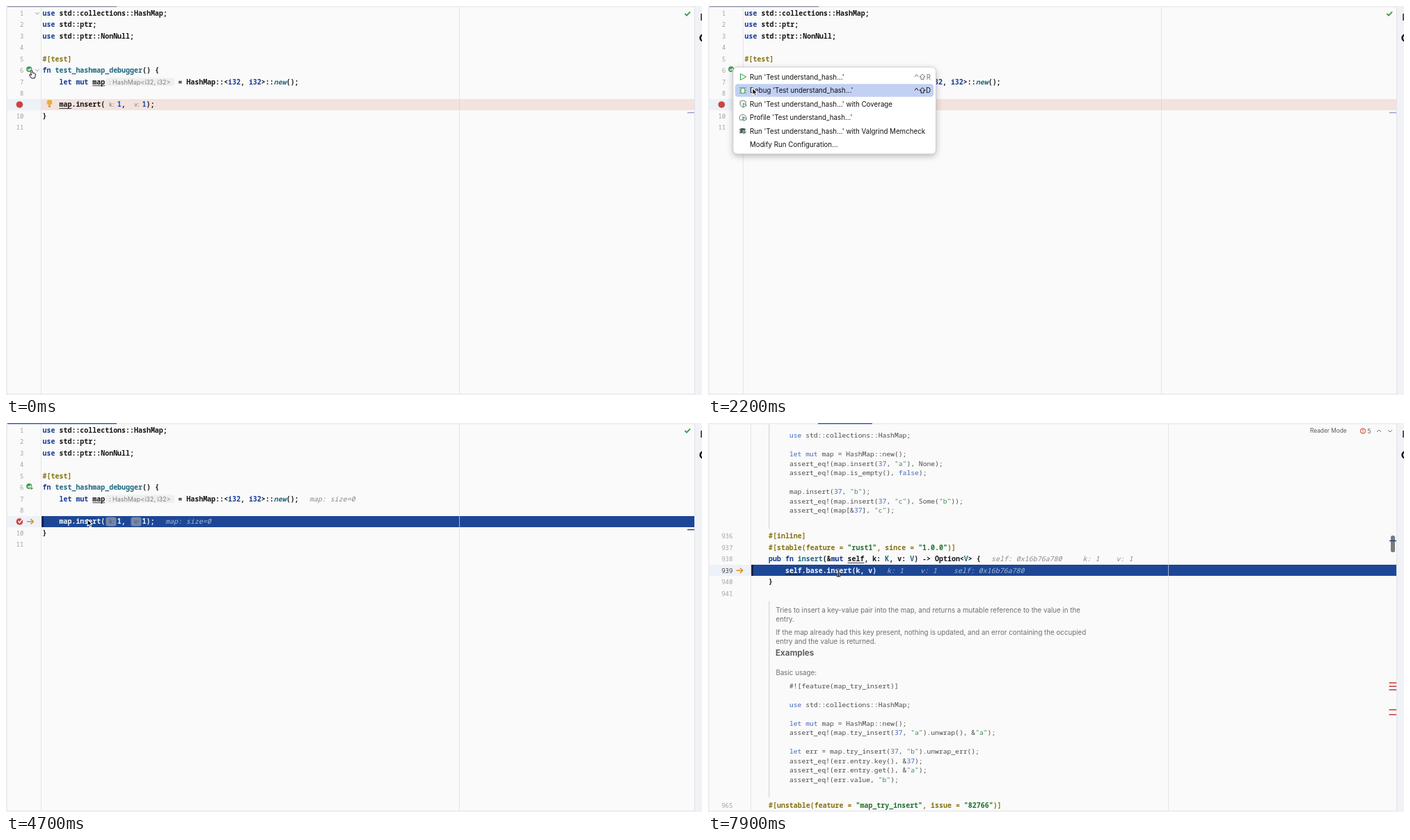
An HTML page with a canvas for the animation above (8000 ms loop, 1000 by 560 pixels).

```html
<!DOCTYPE html>
<html lang="en">
<head>
<meta charset="utf-8">
<title>Debugger step</title>
<style>
html, body { margin: 0; width: 1000px; height: 560px; overflow: hidden; background: #fafafa; }
canvas { display: block; width: 1000px; height: 560px; }
</style>
</head>
<body>
<canvas id="stage"></canvas>
<script>
const canvas = document.getElementById('stage');
const ctx = canvas.getContext('2d');
const dpr = Math.max(1, window.devicePixelRatio || 1);
canvas.width = 1000 * dpr;
canvas.height = 560 * dpr;

const LOOP = 8000;
const MONO = '"Noto Sans Mono", "DejaVu Sans Mono", monospace';
const SANS = 'Inter, "Liberation Sans", sans-serif';
const CODE = 9.96, DOC = 9.68, ADV = CODE * 0.6, ROW = 16.47;
const BLUE = '#1d4796', HINT = '#8a8a8a', GREEN = '#3f9a4e', RED = '#c9443f';

// Moments of the story, in ms
const MENU_OPEN = 1200, MENU_CLOSE = 2800, PAUSED = 4100, STEP_IN = 5100;

const TOKEN = /("[^"]*")|\b(use|fn|let|mut|pub|i32|false)\b|\b(\d+)\b|\b(test_hashmap_debugger|(?<=fn )insert|[KV])\b|\b(new)\b/g;
const BRIGHT = { text: '#151515', str: '#23722f', key: '#173a96', num: '#1c4fc0', fn: '#1d667e', attr: '#857310' };
const DIM = { text: '#4a4a4a', str: '#418a52', key: '#4468bd', num: '#3f66c0', fn: '#4a4a4a', attr: '#4a4a4a' };

function rect(x, y, w, h, color, r) {
  ctx.fillStyle = color;
  ctx.beginPath();
  if (r) ctx.roundRect(x, y, w, h, r); else ctx.rect(x, y, w, h);
  ctx.fill();
}

function path(points, color, width, fill, close) {
  ctx.beginPath();
  for (let i = 0; i < points.length; i += 2) ctx.lineTo(points[i], points[i + 1]);
  if (close || fill) ctx.closePath();
  if (fill) { ctx.fillStyle = fill; ctx.fill(); }
  if (color) { ctx.strokeStyle = color; ctx.lineWidth = width; ctx.stroke(); }
}

function circle(x, y, r, fill, stroke, width = 1) {
  ctx.beginPath();
  ctx.arc(x, y, r, 0, Math.PI * 2);
  if (fill) { ctx.fillStyle = fill; ctx.fill(); }
  if (stroke) { ctx.strokeStyle = stroke; ctx.lineWidth = width; ctx.stroke(); }
}

function text(str, x, y, font, color, align = 'left') {
  ctx.font = font;
  ctx.fillStyle = color;
  ctx.textAlign = align;
  ctx.fillText(str, x, y);
}

const sans = (str, x, y, size, color, weight = 400, align) =>
  text(str, x, y + size * 0.36, `${weight} ${size}px ${SANS}`, color, align);

// Draws a coloured line of code whose middle sits at y
function code(str, x, y, opt = {}) {
  const theme = opt.dim ? DIM : BRIGHT;
  const size = opt.dim ? DOC : CODE;
  const weight = opt.weight || (opt.dim ? 500 : 600);
  const adv = size * 0.6;
  const put = (part, at, color, italic) => part.trim() && text(part, x + at * adv, y + 3.2,
    `${italic ? 'italic ' : ''}${weight} ${size}px ${MONO}`, color);
  if (opt.flat) return put(str, 0, opt.flat, opt.italic);
  const base = str.startsWith('#[') ? theme.attr : theme.text;
  let at = 0;
  for (const m of str.matchAll(TOKEN)) {
    put(str.slice(at, m.index), at, base);
    const kind = m[1] ? 'str' : m[2] ? 'key' : m[3] ? 'num' : 'fn';
    put(m[0], m.index, theme[kind], m[5] && !opt.dim);
    at = m.index + m[0].length;
  }
  put(str.slice(at), at, base);
}

const hint = (str, x, y, color = HINT) => code(str, x, y, { flat: color, italic: true, weight: 500 });
const lineNo = (n, x, y, color = '#a2a2a2') => text(n, x, y + 3.2, `400 8.9px ${MONO}`, color, 'right');
const under = (x, y, chars) => rect(x, y + 5, chars * ADV, 0.9, '#222');
const chevron = (x, y, d, color) => path([x - 3, y - d, x, y + d, x + 3, y - d], color, 1);

function frameChrome(gutter, margin) {
  rect(0, 0, 1000, 560, '#fafafa');
  rect(0, 0, 1, 560, '#eef0f3');
  rect(0, 0.6, 990, 1, '#e5e6ea');
  rect(1, 0, 1, 560, '#e9eaed');
  rect(gutter, 1, 1, 557, '#e6e6e6');
  rect(margin, 1, 1, 557, '#e6e6e6');
  rect(1, 558, 989, 1, '#e3e4e8');
  rect(989, 0, 11, 560, '#f1f2f5');
  rect(989, 0, 1, 560, '#e2e3e7');
  rect(998, 11, 2, 10, '#555');
  circle(1002, 46, 4.5, null, '#181818', 2.6);
}

function execRow(gutter, margin, y) {
  rect(gutter, y, 989 - gutter, 16, BLUE);
  rect(gutter + 1, y, 2, 16, '#0d1d3e');
  rect(margin, y, 1, 16, '#a3b2d2');
}

function execArrow(x, y) {
  path([x, y, x + 9, y], '#d8901e', 1.5);
  path([x + 5.5, y - 3.6, x + 9.3, y, x + 5.5, y + 3.6], '#d8901e', 1.5);
}

function inlay(label, x, y, paused) {
  if (paused) rect(x - 4.5, y - 6.5, 15, 13, '#7887a6', 3);
  sans(label, x, y, 8.95, paused ? '#46566f' : '#7d7d7d');
}

function editor(t) {
  const paused = t >= PAUSED;
  const row = n => 10.5 + (n - 1) * ROW;
  frameChrome(50, 651);
  rect(2, 0, 157, 1.5, paused ? '#2d62d8' : '#9c9eb6');

  const y9 = row(9) - 0.3;
  rect(2, 134, 48, 16, '#edf1f8');
  if (paused) execRow(51, 651, 134);
  else {
    rect(51, 134, 938, 16, '#f3e2dd');
    rect(651, 134, 1, 16, '#e6d5d1');
    if (t >= MENU_CLOSE) rect(100, 135, 37, 14, 'rgba(226,228,242,.7)');
  }
  for (let n = 1; n <= 11; n++) if (n !== 9) lineNo(n, 25.3, row(n));

  const x = 52.6;
  code('use std::collections::HashMap;', x, row(1));
  code('use std::ptr;', x, row(2));
  code('use std::ptr::NonNull;', x, row(3));
  code('#[test]', x, row(5));
  code('fn test_hashmap_debugger() {', x, row(6));
  code('let mut map', x + 4 * ADV, row(7));
  under(x + 12 * ADV, row(7), 3);
  rect(143, 103.5, 99, 11.5, '#efefef', 3);
  sans(':', 148, row(7), 8.95, '#808080');
  sans('HashMap<i32, i32>', 153, row(7), 8.95, '#808080');
  code('= HashMap::<i32, i32>::new();', 247.3, row(7));
  code('}', x, row(10));

  const flat = paused ? '#f4f6fb' : null;
  code('map.insert(', x + 4 * ADV, y9, { flat });
  inlay('k:', 148, y9, paused);
  code('1,', 159.8, y9, { flat });
  inlay('v:', 184, y9, paused);
  code('1);', 195.6, y9, { flat });
  if (paused) {
    hint('map: size=0', 436, row(7));
    hint('map: size=0', 229, y9, '#a9b7d6');
  } else under(x + 4 * ADV, y9, 3);

  circle(19.5, y9, 4.8, RED);
  if (paused) {
    path([17.5, 141, 19.5, 143.5, 24, 137.5], '#fff', 1.5);
    execArrow(30, y9);
  }

  // Test marker
  circle(33.3, 91, 4.1, GREEN);
  path([31.2, 91, 32.8, 92.7, 35.6, 89.4], '#fff', 1.1);
  path([35, 91, 40, 94, 35, 97], '#fafafa', 1, GREEN, true);

  if (t < 1700) {
    chevron(45, 10.5, 1.5, '#a0a0a0');
    chevron(45, 92.5, 1.5, '#a0a0a0');
  }
  if (t < MENU_OPEN) {
    circle(62.5, 138.7, 3.8, '#e9ac42');
    rect(60.9, 141, 3.2, 2.5, '#e9ac42');
    rect(60.9, 144, 3.2, 1.3, '#8a7a60');
  }
  path([975.5, 11, 978, 13.6, 983, 8.3], GREEN, 1.9);
  rect(979, 152.8, 10, 1.5, paused ? '#223f88' : '#9b9cd2');
}

const LABELS = ["Run 'Test understand_hash...'", "Debug 'Test understand_hash...'",
  "Run 'Test understand_hash...' with Coverage", "Profile 'Test understand_hash...'",
  "Run 'Test understand_hash...' with Valgrind Memcheck", 'Modify Run Configuration...'];
const GRAY = '#6c707e';

const ICONS = [
  y => path([46.5, y - 4.5, 55, y, 46.5, y + 4.5], GREEN, 1, '#f2fcf3', true),
  y => {
    for (const d of [-3, 0, 3]) path([45, y + d * 1.2, 55.2, y + d * 1.2], GREEN, 0.9);
    ctx.beginPath();
    ctx.ellipse(50, y + 0.4, 3, 4, 0, 0, Math.PI * 2);
    ctx.fillStyle = '#eefaf0'; ctx.fill();
    ctx.strokeStyle = GREEN; ctx.stroke();
  },
  y => {
    path([46, y - 3.5, 50, y - 5, 54.3, y - 3.5, 54, y + 1, 50, y + 5, 46.4, y + 1.5], GRAY, 1, '#fff', true);
    path([50.5, y - 1, 55.5, y + 2, 50.5, y + 5], GREEN, 1, '#f2fcf3', true);
  },
  y => {
    ctx.beginPath();
    ctx.arc(50, y + 0.5, 4.8, Math.PI * 0.85, Math.PI * 2.05);
    ctx.strokeStyle = GRAY; ctx.lineWidth = 1; ctx.stroke();
    path([45.5, y + 3.5, 50, y + 3.5, 50, y - 2], GRAY, 1);
    path([51, y - 0.5, 56, y + 2.2, 51, y + 5], GREEN, 1, '#f2fcf3', true);
  },
  y => {
    for (const d of [-3, -0.5, 2]) rect(45, y + d, 9.5, 1, '#555');
    rect(46.5, y - 4, 6.5, 7, '#555', 1);
    path([50.3, y - 1, 55.8, y + 2, 50.3, y + 5], '#fff', 0.6, '#2f9c48', true);
  },
  () => {}
];

function shortcut(letter, y, color) {
  path([297, y, 299.5, y - 3.5, 302, y], color, 1);
  path([308, y - 4, 312, y, 310, y, 310, y + 3.5, 306, y + 3.5, 306, y, 304, y], color, 1, null, true);
  sans(letter, 320, y, 9.75, color, 400, 'right');
}

function menu(pos) {
  ctx.save();
  ctx.shadowColor = 'rgba(0,0,0,.28)';
  ctx.shadowBlur = 10 * dpr;
  ctx.shadowOffsetY = 3 * dpr;
  rect(36, 88, 291.5, 125, '#fff', 6);
  ctx.restore();
  ctx.beginPath();
  ctx.roundRect(36, 88, 291.5, 125, 6);
  ctx.strokeStyle = '#c6c7cb'; ctx.lineWidth = 0.8; ctx.stroke();
  const hover = pos.x > 39 ? Math.floor((pos.y - 92.3) / 19.5) : -1;
  LABELS.forEach((label, i) => {
    const y = 102 + i * 19.5;
    if (i === hover) rect(39, y - 9.3, 285, 18.6, '#c1d0f3', 4);
    ICONS[i](y);
    sans(label, 60, y, 9.75, '#111');
    if (i < 2) shortcut('RD'[i], y, i === hover ? '#111' : '#777');
  });
}

const DOC_CODE = [
  [18, 'use std::collections::HashMap;'],
  [45, 'let mut map = HashMap::new();'],
  [58.5, 'assert_eq!(map.insert(37, "a"), None);'],
  [72, 'assert_eq!(map.is_empty(), false);'],
  [99, 'map.insert(37, "b");'],
  [112.5, 'assert_eq!(map.insert(37, "c"), Some("b"));'],
  [126, 'assert_eq!(map[&37], "c");'],
  [378.5, '#![feature(map_try_insert)]'],
  [405.5, 'use std::collections::HashMap;'],
  [432.5, 'let mut map = HashMap::new();'],
  [446, 'assert_eq!(map.try_insert(37, "a").unwrap(), &"a");'],
  [473, 'let err = map.try_insert(37, "b").unwrap_err();'],
  [486.5, 'assert_eq!(err.entry.key(), &37);'],
  [500, 'assert_eq!(err.entry.get(), &"a");'],
  [513.5, 'assert_eq!(err.value, "b");']
];
const PROSE = [
  [269, 'Tries to insert a key-value pair into the map, and returns a mutable reference to the value in the'],
  [282, 'entry.'],
  [301.5, 'If the map already had this key present, nothing is updated, and an error containing the occupied'],
  [314.5, 'entry and the value is returned.'],
  [359, 'Basic usage:']
];

function library() {
  const x = 87, row = n => 163 + (n - 936) * ROW;
  frameChrome(61, 661);
  rect(158, 0, 78, 1.6, '#2d62d8');
  rect(2, 204, 59, 16, '#edf1f8');
  execRow(62, 661, 204);
  for (let n = 936; n <= 941; n++) lineNo(n, 35.5, row(n), n === 939 ? '#3c3c3c' : undefined);
  lineNo(965, 35.5, 551);
  execArrow(40.5, 212.3);

  rect(87, 2, 1.5, 150, '#dedede');
  rect(87, 256, 1.5, 283, '#dedede');
  for (const [y, s] of DOC_CODE) code(s, 117, y, { dim: true });
  for (const [y, s] of PROSE) sans(s, 97.5, y, 9.75, '#6e6e6e');
  sans('Examples', 97, 331, 11.7, '#606060', 700);

  code('#[inline]', x, row(936));
  code('#[stable(feature = "rust1", since = "1.0.0")]', x, row(937));
  code('pub fn insert(&mut self, k: K, v: V) -> Option<V> {', x, row(938));
  under(x + 19 * ADV, row(938), 4);
  code('self.base.insert(k, v)', x + 4 * ADV, row(939), { flat: '#f4f6fb' });
  rect(x + 4 * ADV, row(939) + 5, 4 * ADV, 0.9, '#0d1d3e');
  code('}', x, row(940));
  code('#[unstable(feature = "map_try_insert", issue = "82766")]', x, 551);
  hint('self: 0x16b76a780', 407, row(938));
  hint('k: 1', 538.5, row(938));
  hint('v: 1', 586.5, row(938));
  hint('k: 1', 257, row(939), '#a9b7d6');
  hint('v: 1', 305, row(939), '#a9b7d6');
  hint('self: 0x16b76a780', 353, row(939), '#a9b7d6');

  sans('Reader Mode', 865, 11.5, 8.3, '#5c5c5c');
  circle(941, 11.5, 3.7, '#fbeceb', RED);
  rect(940.5, 9.3, 1, 2.8, RED);
  rect(940.5, 12.8, 1, 1, RED);
  sans('5', 947.5, 11.5, 8.5, '#5c5c5c');
  chevron(964, 11.5, -1.5, '#707070');
  chevron(980, 11.5, 1.5, '#707070');

  rect(981, 162, 6, 24, '#7a7a7a', 2.5);
  rect(979, 168.8, 10, 1.5, '#223f88');
  for (const y of [373.3, 378.3, 383.3, 412, 419]) rect(978.5, y, 10.5, 1.6, RED);
}

// Pointer stops: time, x, y
const STOPS = [[0, 36, 92], [1650, 36, 92], [2100, 64, 118], [2700, 63.5, 118],
  [3250, 63, 118], [3800, 117, 138.5], [6500, 117, 139], [7300, 187.5, 216], [LOOP, 187.5, 216]];

function pointerAt(t) {
  const i = STOPS.findIndex(s => s[0] > t);
  const [t0, x0, y0] = STOPS[i - 1], [t1, x1, y1] = STOPS[i];
  const u = (t - t0) / (t1 - t0), e = u * u * (3 - 2 * u);
  return { x: x0 + (x1 - x0) * e, y: y0 + (y1 - y0) * e };
}

function pointer(t, { x, y }) {
  ctx.save();
  ctx.translate(x, y);
  ctx.lineJoin = 'round';
  if (t < MENU_OPEN) {
    path([-0.5, 1, 0.8, 0.2, 1.7, 1.2, 2.2, 4.3, 5.5, 5, 6.3, 6, 6, 9.5, 5, 12, 0.5, 12,
      -1.8, 8.6, -2.4, 6.8, -1.2, 6.4, 0.4, 7.8], '#111', 1, '#fff');
  } else if (t < STEP_IN) {
    path([0, 0, 0, 9.8, 2.2, 7.9, 3.7, 11.4, 5.5, 10.6, 4, 7.2, 6.8, 7], '#fff', 1.1, '#0a0a0a');
  } else {
    const beam = (color, w) => {
      path([-3, -5, -1, -5, 0, -4, 1, -5, 3, -5], color, w);
      path([-3, 5, -1, 5, 0, 4, 1, 5, 3, 5], color, w);
      path([0, -4, 0, 4], color, w);
    };
    beam('rgba(255,255,255,.8)', 2.2);
    beam('#161616', 1.1);
  }
  ctx.restore();
}

function draw(now) {
  const t = now % LOOP;
  const pos = pointerAt(t);
  ctx.setTransform(dpr, 0, 0, dpr, 0, 0);
  if (t < STEP_IN) editor(t); else library();
  if (t >= MENU_OPEN && t < MENU_CLOSE) menu(pos);
  pointer(t, pos);
}

const start = performance.now();
function tick() {
  draw(performance.now() - start);
  requestAnimationFrame(tick);
}
tick();
</script>
</body>
</html>
```
